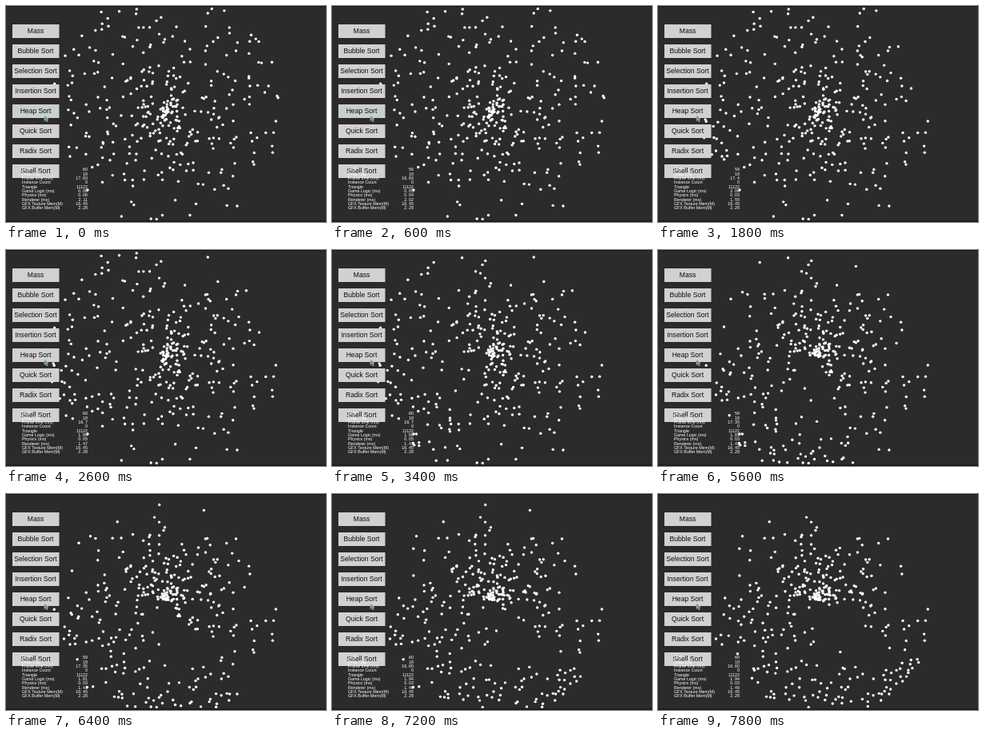
Animation, 400 px wide and 270 px high, one loop 8000 ms. Source, as an HTML page with a canvas:

```html
<!DOCTYPE html>
<html lang="en">
<head>
<meta charset="utf-8">
<title>Heap sort particles</title>
<style>
  html, body { margin: 0; width: 100%; height: 100%; overflow: hidden; background: #2d2a2d; }
  canvas { display: block; }
</style>
</head>
<body>
<canvas id="stage" width="400" height="270"></canvas>
<script>
const ctx = document.getElementById('stage').getContext('2d');
const LOOP = 8000, TICK = 200, SORT_START = 600;
const COUNT = 360, RADIUS = 149, CX = 200, CY = 132;
const ROOT_TIME = 44, SWAP_TIME = 12;
const FONT = '"Liberation Sans", Arial, sans-serif';

let seed = 20;
function random() {
  seed = (seed * 1664525 + 1013904223) % 4294967296;
  return seed / 4294967296;
}

function swap(list, i, j) {
  [list[i], list[j]] = [list[j], list[i]];
}

// Each slot is an angle, each rank a distance from the centre.
function shuffledRanks() {
  const ranks = [...Array(COUNT).keys()];
  for (let i = COUNT - 1; i > 0; i--) swap(ranks, i, Math.floor(random() * (i + 1)));
  return ranks;
}

// Builds the max-heap once and notes when each swap happens.
function planSwaps(ranks) {
  const heap = ranks.slice(), plan = [];
  let time = SORT_START;
  for (let root = COUNT / 2 - 1; root >= 0; root--) {
    time += ROOT_TIME;
    for (let i = root, depth = 0; ; depth++) {
      let child = 2 * i + 1;
      if (child + 1 < COUNT && heap[child + 1] > heap[child]) child++;
      if (child >= COUNT || heap[child] <= heap[i]) break;
      if (depth) time += SWAP_TIME;
      plan.push({ time, i, child });
      swap(heap, i, child);
      i = child;
    }
  }
  return plan;
}

const cloud = shuffledRanks(), swaps = planSwaps(cloud);

const buttons = ['Mass', 'Bubble Sort', 'Selection Sort', 'Insertion Sort',
  'Heap Sort', 'Quick Sort', 'Radix Sort', 'Shell Sort'];
const labels = ['FPS', 'Draw Call', 'Frame time (ms)', 'Instance Count', 'Triangle',
  'Game Logic (ms)', 'Physics (ms)', 'Renderer (ms)', 'GFX Texture Mem(M)', 'GFX Buffer Mem(M)'];

// Profiler readings: start time, fps, frame time, game logic, physics, renderer
const readings = [
  [0, '60', '17. 83', '0. 08', '0. 06', '2. 11'],
  [200, '56', '16. 83', '0. 05', '0. 04', '2. 02'],
  [1200, '59', '17. 4', '2. 08', '0. 03', '1. 55'],
  [2600, '60', '16. 7', '1. 89', '0. 05', '1. 47'],
  [4000, '59', '16. 78', '1. 82', '0. 05', '1. 26'],
  [5400, '59', '17. 35', '1. 81', '0. 03', '1. 41'],
  [7000, '60', '16. 65', '1. 94', '0. 03', '1. 49']
];

function drawDots(time) {
  const ranks = cloud.slice();
  for (const step of swaps) {
    if (step.time > time) break;
    swap(ranks, step.i, step.child);
  }
  ctx.fillStyle = '#fff';
  ranks.forEach((rank, i) => {
    const angle = i / COUNT * 2 * Math.PI, r = rank / COUNT * RADIUS;
    ctx.beginPath();
    ctx.arc(CX + r * Math.cos(angle), CY + r * Math.sin(angle), 1.7, 0, 2 * Math.PI);
    ctx.fill();
  });
}

function drawButtons(time) {
  ctx.font = '8.6px ' + FONT;
  ctx.textAlign = 'center';
  buttons.forEach((name, k) => {
    const y = 31.5 + 25 * k;
    const hovered = name === 'Heap Sort' && time < 1000;
    ctx.fillStyle = hovered ? '#c9cfca' : '#d2d0d3';
    ctx.fillRect(8, y - 8.5, 58.5, 17);
    ctx.fillStyle = '#0c0b0d';
    ctx.fillText(name, 37, y + 0.3);
  });
}

function drawStats(time) {
  const [, fps, frame, logic, physics, renderer] = readings.findLast(row => row[0] <= time);
  const values = [fps, '18', frame, '0', '11122', logic, physics, renderer, '16. 45', '2. 28'];
  ctx.font = '5.3px ' + FONT;
  ctx.fillStyle = '#fff';
  labels.forEach((label, k) => {
    const y = 204.8 + 5.35 * k;
    ctx.textAlign = 'left';
    ctx.fillText(label, 20, y);
    ctx.textAlign = 'right';
    ctx.fillText(values[k], 102, y);
  });
}

function drawCursor() {
  const arrow = new Path2D('M48 136.5v7l1.6-1.3 1.4 2.6 1.2-.6-1.2-2.5 2-.4z');
  ctx.fillStyle = '#6d9a73';
  ctx.strokeStyle = '#c3d6c4';
  ctx.lineWidth = 0.5;
  ctx.fill(arrow);
  ctx.stroke(arrow);
}

function draw(now) {
  const time = Math.floor(now % LOOP / TICK) * TICK;
  ctx.fillStyle = '#2d2a2d';
  ctx.fillRect(0, 0, 400, 270);
  ctx.textBaseline = 'middle';
  drawDots(time);
  drawButtons(time);
  drawStats(time);
  drawCursor();
  ctx.fillStyle = '#171416';
  ctx.fillRect(0, 0, 400, 1);
  ctx.fillStyle = '#1d1518';
  ctx.fillRect(0, 268.5, 400, 1.5);
}

const start = performance.now();
function loop() {
  draw(performance.now() - start);
  requestAnimationFrame(loop);
}
loop();
</script>
</body>
</html>
```
